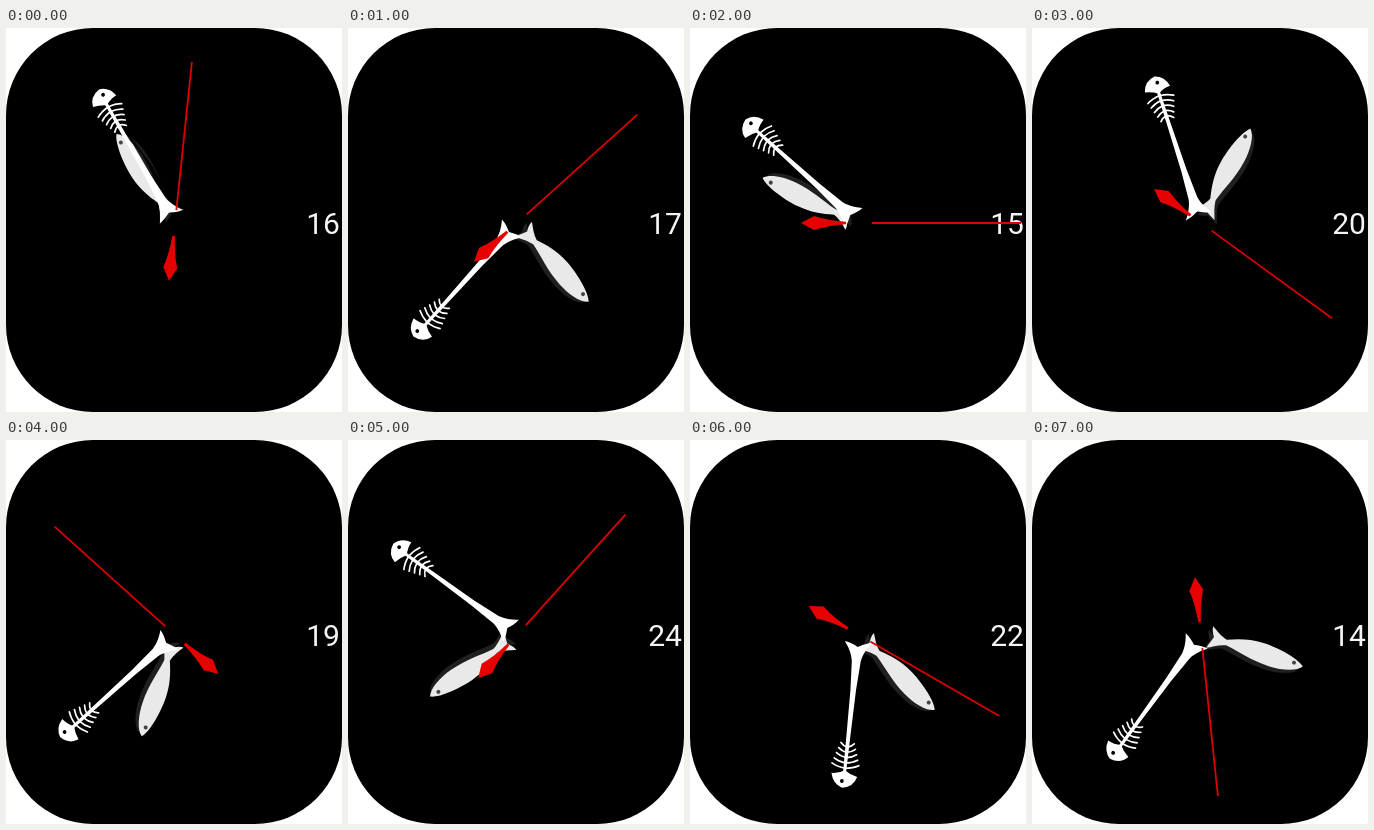
These frames come from a looping animation (336 by 384 pixels, 8000 ms). An HTML page:

```html
<!DOCTYPE html>
<html lang="en">
<head>
<meta charset="utf-8">
<title>Fish watch</title>
<style>
  html, body { margin: 0; width: 100%; height: 100%; overflow: hidden; background: #fff; }
  svg { display: block; width: 336px; height: 384px; }
  text {
    font: 400 30px Roboto, sans-serif; font-stretch: 86%;
    fill: #f4f4f4; text-anchor: middle;
  }
</style>
</head>
<body>
<svg viewBox="0 0 336 384">
  <defs>
    <!-- All hands point up, with the pivot at 0,0 -->
    <path id="fish" d="M-1.5-106.5C-7-101-11.7-80-11.7-62C-11.7-48-8-37-3.5-26C-5-19-9-14-12-9
      C-8-9-5-11-2-13C2-12 6-10 10.5-9C8-14 4-19 2-27C4-42 8.7-55 8.7-74C8.7-88 5-102-1.5-106.5Z"/>
  </defs>
  <rect width="336" height="384" rx="87"/>
  <text id="day" x="317" y="206"></text>
  <g id="hour">
    <use href="#fish" x="4.5" y="3" fill="#1f1f1f"/>
    <use href="#fish" fill="#e9e9e9"/>
    <circle cx="-2.4" cy="-97" r="2" fill="#444"/>
  </g>
  <g id="minute" fill="#fff">
    <path d="M3-110L9-62L8-28L3-26Z" fill="#000" opacity=".86"/>
    <path d="M-1.5-138L1.5-138L2-100L2.8-55L4.5-26C6-18 10-12 13.5-7.5C8-8 4-10 0-12
      C-4-10-8-8-13.5-7C-10-12-6-18-4.5-26L-2.8-55L-2-100Z"/>
    <path d="M0-136Q-6-140-13-141.5Q-10.5-152 1-153.7Q10.5-151 13-140Q6-140 0-136Z"/>
    <path id="ribs" fill="none" stroke="#fff" stroke-width="1.7" stroke-linecap="round"/>
    <circle cx="1.8" cy="-147" r="1.9" fill="#000"/>
  </g>
  <g id="second" fill="#e60000">
    <path d="M-.9-162H.9V-13H-.9Z" fill="#dc0000"/>
    <path d="M-1.3 13H1.3C2 25 4 36 7 45L0 58L-7 45C-4 36-2 25-1.3 13Z"/>
  </g>
</svg>
<script>
  const STEP = 1000;
  // hour, minute, second, day
  const states = [
    [10, 55, 1, 16],
    [4, 37, 8, 17],
    [9, 52, 15, 15],
    [0, 57, 21, 20],
    [6, 38, 52, 19],
    [7, 51, 7, 24],
    [4, 31, 20, 22],
    [3, 36, 29, 14]
  ];
  const el = id => document.getElementById(id);
  const turn = (id, deg) =>
    el(id).setAttribute('transform', `translate(169 195) rotate(${deg})`);

  let ribs = '';
  for (let i = 0; i < 5; i++) {
    const y = -134 + i * 5.3, w = 13.5 - i * 1.7;
    for (const s of [-1, 1]) ribs += `M0 ${y}Q${s * w * .6} ${y + .8} ${s * w} ${y + 4}`;
  }
  el('ribs').setAttribute('d', ribs);

  let shown = -1;
  function draw(now) {
    const i = Math.floor(now / STEP) % states.length;
    if (i !== shown) {
      const [h, m, s, day] = states[shown = i];
      turn('hour', h * 30 + m / 2);
      turn('minute', m * 6);
      turn('second', s * 6);
      el('day').textContent = day;
    }
  }

  const start = performance.now();
  function tick() {
    draw(performance.now() - start);
    requestAnimationFrame(tick);
  }
  tick();
</script>
</body>
</html>
```
